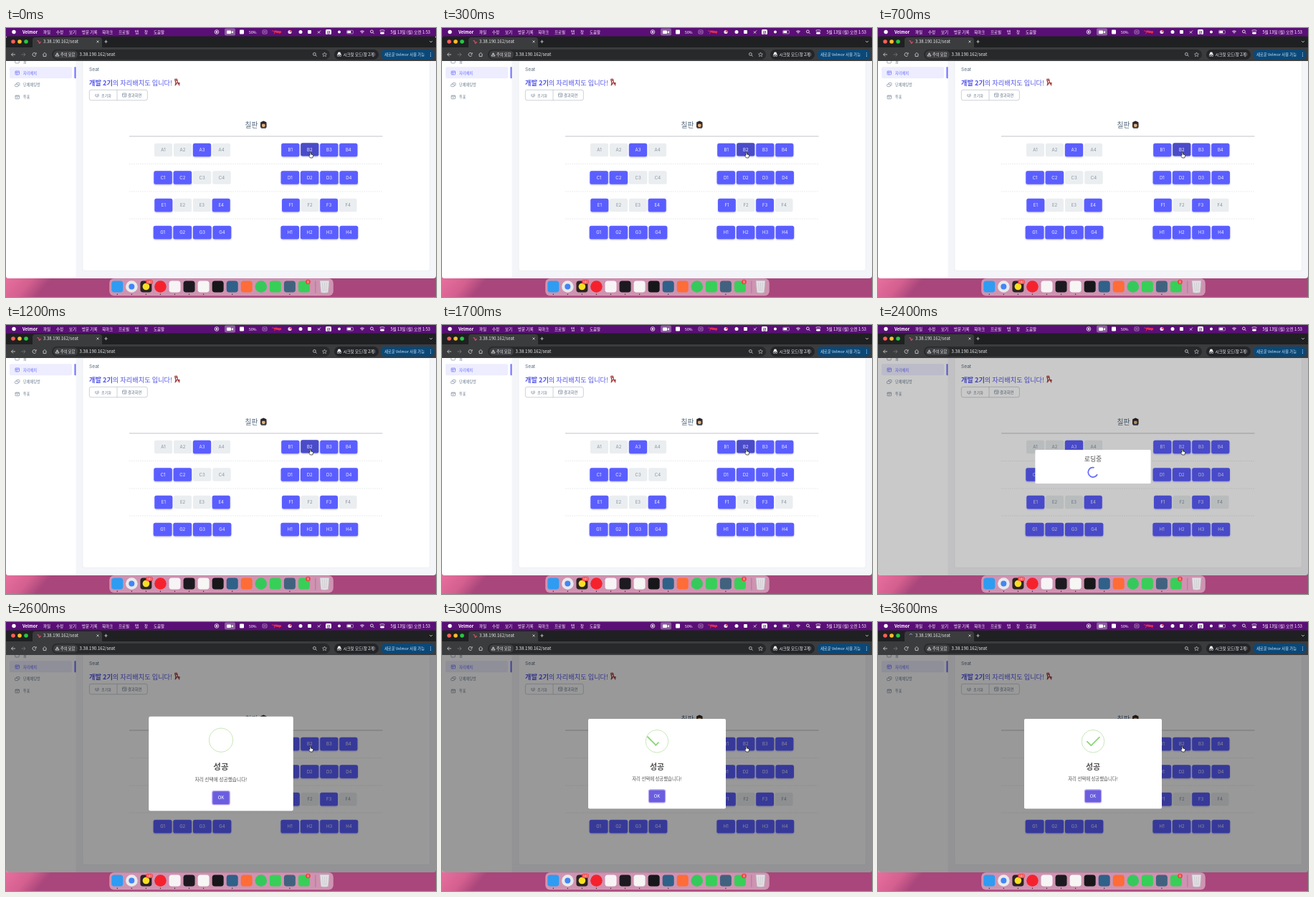
An HTML page with a canvas for the animation above (3700 ms loop, 600 by 375 pixels).

```html
<!DOCTYPE html>
<html lang="ko">
<head>
<meta charset="utf-8">
<title>Seat</title>
<style>
html, body { margin: 0; width: 100%; height: 100%; overflow: hidden; }
canvas { display: block; width: 600px; height: 375px; }
</style>
</head>
<body>
<canvas></canvas>
<script>
const canvas = document.querySelector('canvas');
const ctx = canvas.getContext('2d');
const dpr = window.devicePixelRatio || 1;
canvas.width = 600 * dpr;
canvas.height = 375 * dpr;

const LOOP = 3700, STEP = 100;
const PRESS = 2300, LOADING = 2346, SUCCESS = 2465, RELOAD = 3500;
const FONT = '"Noto Sans CJK KR", "Noto Sans CJK", Inter, sans-serif';
const BLUE = '#5b5eff', GRAY = '#697a8d';

function box(x, y, w, h, r, fill, stroke, lw = 0.6) {
  ctx.beginPath();
  ctx.roundRect(x, y, w, h, r);
  if (fill) { ctx.fillStyle = fill; ctx.fill(); }
  if (stroke) { ctx.strokeStyle = stroke; ctx.lineWidth = lw; ctx.stroke(); }
}

function arc(x, y, r, fill, stroke, lw = 0.8, a = 0, b = 2 * Math.PI) {
  ctx.beginPath();
  ctx.arc(x, y, r, a, b);
  if (fill) { ctx.fillStyle = fill; ctx.fill(); }
  if (stroke) { ctx.strokeStyle = stroke; ctx.lineWidth = lw; ctx.stroke(); }
}

function path(d, x, y, stroke, lw = 0.8, fill) {
  const p = new Path2D(d);
  ctx.save();
  ctx.translate(x, y);
  if (fill) { ctx.fillStyle = fill; ctx.fill(p); }
  if (stroke) { ctx.strokeStyle = stroke; ctx.lineWidth = lw; ctx.stroke(p); }
  ctx.restore();
}

function text(s, x, y, size, color, weight = 400, align = 'left', font = FONT) {
  ctx.font = `${weight} ${size}px ${font}`;
  ctx.textAlign = align;
  ctx.fillStyle = color;
  ctx.fillText(s, x, y);
}

// Keys are [time, value, value, ...]; values are interpolated linearly.
function keyed(keys, t) {
  let i = 1;
  while (i < keys.length - 1 && t > keys[i][0]) i++;
  const a = keys[i - 1], b = keys[i];
  const k = Math.min(1, Math.max(0, (t - a[0]) / (b[0] - a[0])));
  return a.slice(1).map((v, j) => v + (b[j + 1] - v) * k);
}

function magnifier(x, y, color) {
  arc(x - 0.6, y - 0.6, 1.9, null, color);
  path('M.8 .8L2.6 2.6', x, y, color);
}

function drawDesktop() {
  const g = ctx.createLinearGradient(0, 345, 40, 378);
  g.addColorStop(0, '#e8709f');
  g.addColorStop(0.6, '#d4608f');
  g.addColorStop(1, '#a9467b');
  ctx.fillStyle = g;
  ctx.fillRect(0, 340, 600, 35);
}

function drawMenuBar(t) {
  ctx.fillStyle = '#5a0f76';
  ctx.fillRect(0, 0, 600, 12);
  arc(11, 5.5, 2.7, '#fff');
  text('Velmor', 23, 7.6, 6, '#fff', 700);
  const items = [['파일', 52], ['수정', 70], ['보기', 88], ['방문 기록', 106], ['북마크', 134],
    ['프로필', 157], ['탭', 180], ['창', 193], ['도움말', 206]];
  for (const [s, x] of items) text(s, x, 7.6, 5.5, '#fff', 500);

  arc(294, 5.5, 2.8, null, '#fff');
  arc(294, 5.5, 1.3, '#fff');
  box(305, 0.5, 15, 10, 2, '#8c5c9f');
  box(308, 3.5, 6, 4.5, 1, '#fff');
  path('M0 0L2.5-1.5V2L0 .7Z', 314.5, 5.5, null, 0, '#fff');
  box(326, 2.5, 6, 6, 1, '#fff');
  text('50%', 339, 7.6, 5.2, '#fff', 500);
  box(358, 3, 6, 5, 1, null, '#d8c4e0');
  path('M-1.6 0h3.2', 361, 5.5, '#d8c4e0');

  const leg = Math.sin(t / STEP * 1.7);
  ctx.fillStyle = '#e02f50';
  ctx.beginPath();
  ctx.ellipse(378, 5.2, 4.3, 1.5, 0.15, 0, 7);
  ctx.fill();
  arc(382.5, 5.6, 1.7, '#e02f50');
  path(`M-3 0L${-4 + leg} 3M3 0L${4 - leg} 3M-4-.5Q-6-2-7-1`, 378, 5.2, '#e02f50', 1);

  arc(396, 5.5, 2.6, '#e8e0ec');
  arc(397, 4.5, 1.3, '#e0405a');
  arc(411, 5.5, 2.5, '#fff');
  box(421, 3, 5, 5, 1, '#fff');
  path('M-2 2L2-2M-2-1L1 2', 437, 5.5, '#fff');
  box(446, 2, 8, 7, 1.5, '#fff');
  text('한', 450, 7.5, 5, '#5a0f76', 700, 'center');
  arc(465, 5.5, 2, '#fff');
  box(475.5, 3.3, 9, 4.6, 1.2, null, '#d9c8e0');
  box(476.3, 4.1, 5, 3, 0.6, '#fff');
  for (const r of [1.2, 2.7, 4.2]) arc(497, 8, r, null, '#fff', 0.8, -2.3, -0.84);
  magnifier(511, 5.5, '#fff');
  box(522, 2.7, 6, 2.3, 1.2, null, '#fff');
  box(522, 6.1, 6, 2.3, 1.2, '#fff');
  text('5월 13일 (월) 오전 1:53', 592, 7.6, 5.7, '#fff', 500, 'right');
}

function drawBrowser(t) {
  const pale = '#d5d6d9';
  box(0, 11.5, 600, 30, [4, 4, 0, 0], '#1f2022');
  ['#ff5f57', '#febc2e', '#28c840'].forEach((c, i) => arc(10 + i * 9, 19, 2.8, c));
  box(37, 13, 97, 16, [4, 4, 0, 0], '#3b3c3e');
  if (t >= RELOAD) {
    const a = t / 160;
    arc(46, 19, 2.4, null, '#a8c7fa', 0.8, a, a + 2);
  } else {
    path('M-2.5-1Q-.5-2 0 1T2.5 0', 46, 19, '#d05068', 1.3);
  }
  text('3.38.190.162/seat', 52, 21.2, 6, '#e8e8e8');
  path('M-1.5-1.5L1.5 1.5M1.5-1.5L-1.5 1.5', 128, 19, pale);
  path('M-2.2 0H2.2M0-2.2V2.2', 139.5, 19, pale);
  path('M-2-1L0 1L2-1', 593, 19, pale);

  ctx.fillStyle = '#3b3c3e';
  ctx.fillRect(0, 27, 600, 19.5);
  path('M3 0H-2.5M0-2.5L-2.5 0L0 2.5', 10, 37, pale);
  path('M-3 0H2.5M0-2.5L2.5 0L0 2.5', 24.5, 37, '#777a7e');
  arc(39.5, 37, 2.5, null, pale, 0.8, 0.4, 5.5);
  path('M2.6-2.8V-.6H.5', 39.5, 37, pale);
  path('M-2.7 0L0-2.6L2.7 0M-1.9-.5V2.6H1.9V-.5', 54, 37, pale);

  box(64, 30, 388, 14, 7, '#28292b');
  box(66, 31.5, 34, 11, 5.5, '#3e3f42');
  path('M0-2.3L2.5 2H-2.5Z M0-.8V.7', 71.5, 37, '#fff', 0.7);
  text('주의 요함', 76, 39.1, 5.2, '#f0f0f0');
  text('3.38.190.162/seat', 102.5, 39.2, 6.1, '#f0f0f0');
  magnifier(431, 37, pale);
  path('M0-3L.9-1L3-.8L1.4 .6L1.9 2.7L0 1.6L-1.9 2.7L-1.4 .6L-3-.8L-.9-1Z', 444.5, 37, pale, 0.6);

  box(458, 30, 62, 14, 7, '#242528');
  path('M-3 0H3M-1.7 0L-1.2-2.5H1.2L1.7 0', 465, 36.5, '#fff', 0.7, '#fff');
  arc(463.5, 38.4, 1.1, null, '#fff', 0.7);
  arc(466.5, 38.4, 1.1, null, '#fff', 0.7);
  text('시크릿 모드(창 2개)', 470.5, 39.1, 5.5, '#fff');
  box(523, 30, 75, 14, 7, '#0b4877');
  text('새로운 Velmor 사용 가능', 528, 39.1, 5.4, '#d3e8ff');
  for (const y of [34.8, 37, 39.2]) arc(592.5, y, 0.6, '#d3e8ff');
}

function drawSidebar() {
  box(0, 46, 97.5, 303, [0, 0, 0, 4], '#fff');
  box(12.7, 44, 5.6, 5, 1, null, GRAY);
  text('홈', 24, 48.5, 5.2, GRAY);
  box(5, 54.3, 87, 16, 2, '#ededff');
  box(95.5, 54.3, 2, 16, [1, 0, 0, 1], '#696cff');
  box(13, 60, 5.5, 5, 0.7, null, '#696cff', 0.7);
  path('M-2.7-.8H2.7M-.5-.8V2.5', 15.7, 62.5, '#696cff', 0.7);
  text('자리배치', 24, 64.5, 5.2, '#696cff', 500);
  box(14.5, 76.5, 4.5, 3.6, 1, null, GRAY);
  box(12.5, 78.3, 4.5, 3.4, 1, '#fff', GRAY);
  text('단체채팅방', 24, 81.4, 5.2, GRAY);
  box(13, 94, 5.5, 4.8, 0.6, null, GRAY);
  path('M-2.7-1.2H2.7M-1 .8H1', 15.7, 96.2, GRAY, 0.7);
  text('투표', 24, 98.3, 5.2, GRAY);
}

const SEATS = [
  ['A', 260, 27, 170, '3'], ['B', 437.3, 27, 170, '1234'],
  ['C', 260, 27.3, 208.5, '12'], ['D', 437.3, 27.3, 208.5, '1234'],
  ['E', 260, 26.8, 247, '14'], ['F', 437.3, 26.6, 247, '13'],
  ['G', 260, 27.6, 285, '1234'], ['H', 437.3, 27.4, 285, '1234']
];

function drawSeats(t) {
  for (const [row, cx, pitch, cy, taken] of SEATS) {
    for (let n = 1; n <= 4; n++) {
      const x = cx + (n - 2.5) * pitch, w = pitch - 1.8;
      const on = taken.includes(n), hover = row === 'B' && n === 2;
      const pressed = hover && t >= PRESS;
      const y = hover && !pressed ? cy - 0.6 : cy;
      ctx.save();
      if (on) {
        ctx.shadowColor = 'rgba(91,94,255,.45)';
        ctx.shadowBlur = 2 * dpr;
        ctx.shadowOffsetY = dpr;
      }
      const fill = pressed && t < LOADING ? '#3e3f9f' : hover && t < LOADING ? '#4a4bc8' : on ? BLUE : '#ebeef0';
      box(x - w / 2, y - 9.2, w, 18.4, 2.5, fill);
      ctx.restore();
      text(row + n, x, y + 2.2, 6, on ? '#eeeeff' : '#8592a3', 400, 'center', 'Inter, sans-serif');
    }
  }
}

function drawPage(t) {
  box(0, 46, 600, 303, [0, 0, 4, 4], '#f4f5f9');
  drawSidebar();
  box(107, 46, 484.5, 292.5, [0, 0, 3, 3], '#fff', '#e6e7ec');
  text('Seat', 116, 60.3, 6.6, '#566a7f', 400, 'left', 'Inter, sans-serif');
  text('개발 2기', 116, 79.6, 9.2, '#5053e8', 700);
  const bold = ctx.measureText('개발 2기').width;
  text('의 자리배치도 입니다!', 116 + bold, 79.6, 9.2, '#5053e8', 500);
  path('M-3.5-4.5L-2 .8H3L2.5 4.5M-2 .8L-3 4.5M2 .8L1 3M-1.5 .8V3.5M-3-2.5H0L.7 .8M-3.5-4.5H-.5L0-2.5',
    239, 75.8, '#a33b3b', 1.2);

  box(116.3, 86.3, 81, 14.5, 2.5, '#fff', '#a9b2bd');
  path('M0 0V14.5', 155, 86.3, '#a9b2bd', 0.6);
  arc(127, 93.7, 2.3, null, GRAY, 0.7, -1.2, 4);
  path('M0-1.2V.3H1.2', 127, 93.7, GRAY, 0.6);
  text('초기화', 133, 95.6, 5.1, GRAY);
  box(162.5, 91, 5.5, 5, 0.7, null, GRAY);
  path('M-2.7-.9H2.7M-.4 1H1.8', 165.2, 93.7, GRAY, 0.6);
  text('결과화면', 170, 95.6, 5.3, GRAY);

  text('칠판', 333.6, 138.7, 9.8, '#566a7f', 500);
  box(355, 131, 8.6, 8.5, 2, '#3a302e');
  arc(359.3, 135.8, 2.4, '#e7b27d');
  path('M-4.5 0L0-2L4.5 0L0 2Z', 359.3, 131.6, null, 0, '#28282c');
  box(356, 138, 6.8, 2, 0.8, '#49505c');
  path('M172 151H525.5', 0, 0, '#b9bdc4', 0.9);
  ctx.setLineDash([2, 1]);
  for (const y of [189.5, 228, 266]) path(`M172 ${y}H525.5`, 0, 0, '#dcdfe3', 0.6);
  ctx.setLineDash([]);

  drawSeats(t);
  if (t >= LOADING) {
    box(0, 46, 600, 303, [0, 0, 4, 4], `rgba(0,0,0,${t < SUCCESS ? 0.21 : 0.4})`);
  }
}

function drawCheck(age) {
  const k = age / 750;
  const [tx, ty, tw] = keyed([[0.54, 0.125, 1.0625, 0], [0.7, -0.375, 2.1875, 3.125],
    [0.84, 1.3125, 3, 1.0625], [1, 0.8125, 2.875, 1.5625]], k);
  const [lr, ly, lw] = keyed([[0.65, 2.875, 3.375, 0], [0.84, 0, 2.1875, 3.4375],
    [1, 0.5, 2.375, 2.9375]], k);
  const bar = (x, y, w, angle) => {
    if (w <= 0) return;
    ctx.save();
    ctx.translate((x + w / 2 - 2.5) * 6, (y - 2.344) * 6);
    ctx.rotate(angle);
    box(-w * 3, -0.95, w * 6, 1.9, 0.75, '#8fd67c');
    ctx.restore();
  };
  bar(tx, ty, tw, Math.PI / 4);
  bar(5 - lr - lw, ly, lw, -Math.PI / 4);
}

function drawModal(t) {
  if (t < LOADING) return;
  const done = t >= SUCCESS;
  const age = t - (done ? SUCCESS : LOADING);
  const [scale] = keyed([[0, 0.7], [135, 1.05], [240, 0.95], [300, 1]], age);
  ctx.save();
  ctx.translate(300, 197.6);
  ctx.scale(scale, scale);
  if (done) {
    box(-96, -62.6, 192, 125.2, 2, '#fff');
    ctx.save();
    ctx.translate(0, -31.4);
    arc(0, 0, 15.8, null, '#c3e6b3', 0.9);
    drawCheck(age);
    ctx.restore();
    text('성공', 0, 8.3, 11, '#545454', 600, 'center');
    text('자리 선택에 성공했습니다!', 0, 23.4, 6.4, '#545454', 400, 'center');
    box(-11.6, 36.2, 23.2, 18, 2.2, '#6a5ee0', '#b9a3ee', 1.2);
    text('OK', 0, 47.4, 6, '#fff', 500, 'center');
  } else {
    box(-96, -28, 192, 56, 2, '#fff');
    text('로딩중', 0, -8.6, 10.6, '#545454', 500, 'center');
    const a = 0.45 + (age - 54) / 1500 * 2 * Math.PI;
    arc(0, 9.2, 8, null, '#696cff', 2.1, a, a + 4.5);
  }
  ctx.restore();
}

function drawCursor() {
  path('M-1-3.4Q0-4.4 .6-3.2V-1L3.2-.3Q3.9 0 3.6 1.2L2.8 4H-.5L-2.6 1Q-2.4-.2-1 .6Z',
    425, 177, '#111', 0.7, '#fff');
}

// Dock tiles: colour, round or square, running dot.
const DOCK = [
  ['#2e9cf2', 0, 1], ['#e9e9e9', 1, 1], ['#2c2322', 0, 1], ['#f5222d', 1, 1], ['#f7f4f6', 0, 1],
  ['#1c1a20', 0, 1], ['#f6f6f4', 0, 1], ['#17171a', 0, 0], ['#2f6189', 0, 1], ['#ff6c37', 0, 0],
  ['#35c95c', 1, 0], ['#37cf58', 0, 0], ['#41627e', 0, 1], ['#37cf58', 0, 0]
];

function drawDock() {
  box(144.5, 349.5, 312, 23.5, 6, 'rgba(234,198,214,.6)', 'rgba(255,255,255,.3)', 0.5);
  DOCK.forEach(([color, round, dot], i) => {
    const x = 155.3 + i * 20.05;
    if (round) arc(x, 360.5, 8.3, color);
    else box(x - 8, 352.5, 16, 16, 3.8, color);
    if (dot) arc(x, 371.2, 0.7, '#3a2030');
  });
  arc(175.3, 360.5, 4, '#4285f4');
  arc(195.4, 360.5, 4.8, '#f7df24');
  box(195, 351, 10, 6, 3, '#f23b3b');
  text('300', 200, 355.7, 4.4, '#fff', 500, 'center');
  arc(421.5, 354, 3.3, '#f23b3b');
  text('8', 421.5, 356, 5.2, '#fff', 500, 'center');
  path('M0 0V17', 431.8, 352.5, 'rgba(90,50,80,.45)', 0.6);
  path('M-6.5-8.5H6.5L5 8Q0 9.3-5 8Z', 444.5, 360.7, '#b9b9bf', 0.6, '#e2e0e4');
  path('M-3-6L-2 6M0-6V6M3-6L2 6', 444.5, 361, '#c3c1c7', 0.6);
}

function draw(t) {
  ctx.setTransform(dpr, 0, 0, dpr, 0, 0);
  drawDesktop();
  drawMenuBar(t);
  drawBrowser(t);
  ctx.save();
  ctx.beginPath();
  ctx.rect(0, 46, 600, 329);
  ctx.clip();
  drawPage(t);
  drawCursor();
  drawModal(t);
  ctx.restore();
  drawDock();
}

const start = performance.now();
function tick() {
  const t = (performance.now() - start) % LOOP;
  draw(Math.floor(t / STEP) * STEP);
  requestAnimationFrame(tick);
}
tick();
</script>
</body>
</html>
```
